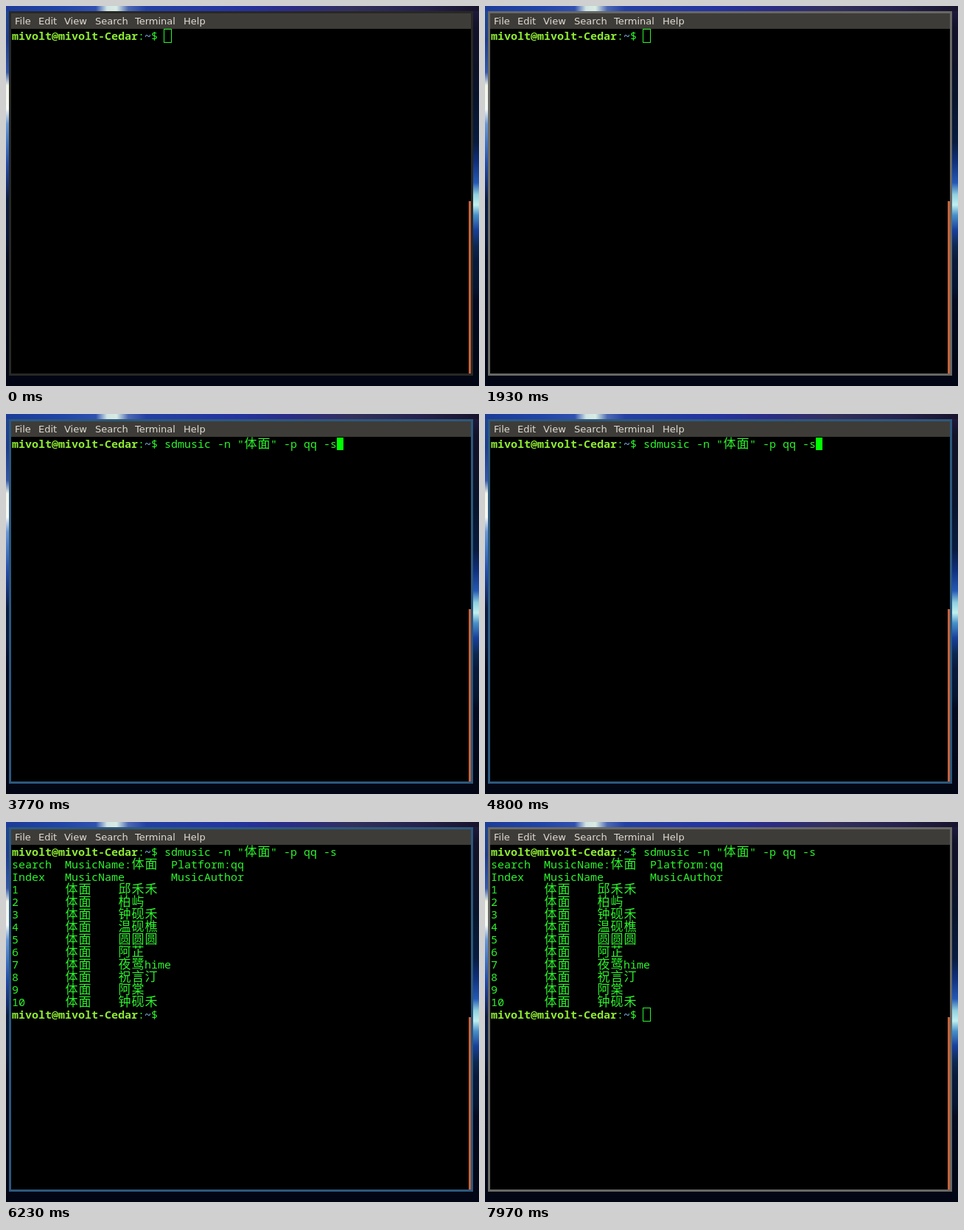
These frames come from a looping animation (642 by 516 pixels, 8000 ms). An HTML page with a canvas:

```html
<!DOCTYPE html>
<html lang="zh-CN">
<head>
<meta charset="utf-8">
<title>Terminal</title>
<style>
html, body { margin: 0; width: 100%; height: 100%; overflow: hidden; background: #000; }
canvas { display: block; width: 642px; height: 516px; }
</style>
</head>
<body>
<canvas id="stage" width="642" height="516"></canvas>
<script>
const ctx = document.getElementById('stage').getContext('2d');
const LOOP = 8000, CELL = 9, ROW = 17, LEFT = 8, TOP = 32;
const MONO = '15px "Noto Sans Mono", "DejaVu Sans Mono", monospace';
const WIDE = '17px "Noto Sans CJK SC", "Noto Sans CJK JP", "Noto Sans CJK", sans-serif';
const MENU = '13px "DejaVu Sans", sans-serif';
const GREEN = '#2cf42c', LIME = '#8eea34';

// Event times in ms
const SHOWN = 250, FOCUS = 2100, RECALL = 3500, ENTER = 5100,
      SEARCH = 5250, RESULT = 5600, BLUR = 7750, BLINK = 600;

const USER = 'mivolt', HOST = 'mivolt-Cedar';
const PROMPT = USER + '@' + HOST;
const PROMPT_COLS = PROMPT.length + 4;
const SONG = '体面';
const COMMAND = `sdmusic -n "${SONG}" -p qq -s`;
const AUTHORS = ['邱禾禾', '柏屿', '钟砚禾', '温砚樵', '圆圆圆', '阿芷',
                 '夜鹭hime', '祝言汀', '阿棠', '钟砚禾'];

const isWide = ch => ch > '\u2e7f';
const columns = s => [...s].reduce((n, ch) => n + (isWide(ch) ? 2 : 1), 0);

function box(x, y, w, h, color) {
  ctx.fillStyle = color;
  ctx.fillRect(x, y, w, h);
}

// Draws text on the terminal's character grid
function put(col, row, text, color = GREEN, bold = false) {
  ctx.fillStyle = color;
  for (const ch of text) {
    const wide = isWide(ch);
    const x = LEFT + col * CELL, y = TOP + row * ROW + 14;
    ctx.font = wide ? WIDE : (bold ? 'bold ' : '') + MONO;
    ctx.fillText(ch, wide ? x + 0.5 : x, y);
    col += wide ? 2 : 1;
  }
}

function prompt(row) {
  const n = PROMPT.length;
  put(0, row, PROMPT, LIME, true);
  put(n, row, ':');
  put(n + 1, row, '~', '#729fcf', true);
  put(n + 2, row, '$');
}

function gradient(x, y, w, h, vertical, stops) {
  const g = vertical ? ctx.createLinearGradient(0, y, 0, y + h)
                     : ctx.createLinearGradient(x, 0, x + w, 0);
  const size = vertical ? h : w;
  for (const [at, color] of stops) g.addColorStop(at / size, color);
  box(x, y, w, h, g);
}

function wallpaper() {
  box(0, 0, 642, 516, '#020614');
  gradient(0, 0, 4, 516, true, [
    [0, '#204890'], [45, '#1c3c8c'], [90, '#3458a8'], [108, '#f0f4e8'], [140, '#f4f8f4'],
    [160, '#6c98d4'], [185, '#4478c4'], [215, '#244ca8'], [248, '#142c68'],
    [264, '#0a1c40'], [310, '#08183a'], [346, '#040a20'], [516, '#020614']
  ]);
  gradient(634, 0, 8, 516, true, [
    [0, '#201c40'], [30, '#12122a'], [80, '#0e1228'], [125, '#08142c'], [185, '#081c40'],
    [212, '#10307c'], [240, '#2458b4'], [256, '#90d0e0'], [270, '#c0f0f0'],
    [284, '#4890c8'], [304, '#18409c'], [326, '#0c2850'], [345, '#081a3c'],
    [384, '#061430'], [400, '#040a20'], [516, '#020614']
  ]);
  gradient(0, 0, 642, 7, false, [
    [0, '#1c3c98'], [75, '#2044a8'], [122, '#3050b0'], [137, '#d0e4e4'], [150, '#d8ece4'],
    [166, '#4c68b4'], [190, '#2440a4'], [310, '#2434a0'], [390, '#2c2c84'],
    [470, '#34305c'], [550, '#282450'], [642, '#18142c']
  ]);
}

function frame(t) {
  const border = t < SHOWN ? '#282824'
    : t >= FOCUS && t < BLUR ? '#2c587c' : '#686864';
  box(4, 7, 630, 495, border);
  box(7, 10, 624, 489, '#000');
  box(7, 10, 624, 21, '#3e3c38');
  box(628, 265, 3, 234, '#c4623c');
  ctx.font = MENU;
  ctx.fillStyle = '#dfdbd2';
  const items = [['File', 12], ['Edit', 44], ['View', 79],
                 ['Search', 121], ['Terminal', 175], ['Help', 241]];
  for (const [label, x] of items) ctx.fillText(label, x, 25);
}

function results() {
  put(0, 2, 'Index');
  put(8, 2, 'MusicName');
  put(24, 2, 'MusicAuthor');
  AUTHORS.forEach((name, i) => {
    put(0, i + 3, String(i + 1));
    put(8, i + 3, SONG);
    put(16, i + 3, name);
  });
  prompt(13);
}

function cursor(t) {
  let col = PROMPT_COLS, row = 0;
  if (t >= RESULT) row = 13;
  else if (t >= ENTER) [col, row] = [0, t < SEARCH ? 1 : 2];
  else if (t >= RECALL) col += columns(COMMAND);
  const x = LEFT + col * CELL, y = TOP + row * ROW;
  if (t < FOCUS || t >= BLUR) {
    ctx.strokeStyle = GREEN;
    ctx.lineWidth = 1;
    ctx.strokeRect(x - 0.5, y - 0.5, 10, 18);
    return;
  }
  // Each key press restarts the blink
  const since = t - (t >= ENTER ? ENTER : t >= RECALL ? RECALL : FOCUS);
  if (since % (2 * BLINK) < BLINK) box(x, y, CELL, ROW, '#00ff00');
}

function draw(t) {
  wallpaper();
  frame(t);
  prompt(0);
  if (t >= RECALL) put(PROMPT_COLS, 0, COMMAND);
  if (t >= SEARCH) {
    put(0, 1, 'search');
    put(8, 1, 'MusicName:' + SONG);
    put(24, 1, 'Platform:qq');
  }
  if (t >= RESULT) results();
  cursor(t);
}

const start = performance.now();
function tick() {
  draw((performance.now() - start) % LOOP);
  requestAnimationFrame(tick);
}
tick();
</script>
</body>
</html>
```
